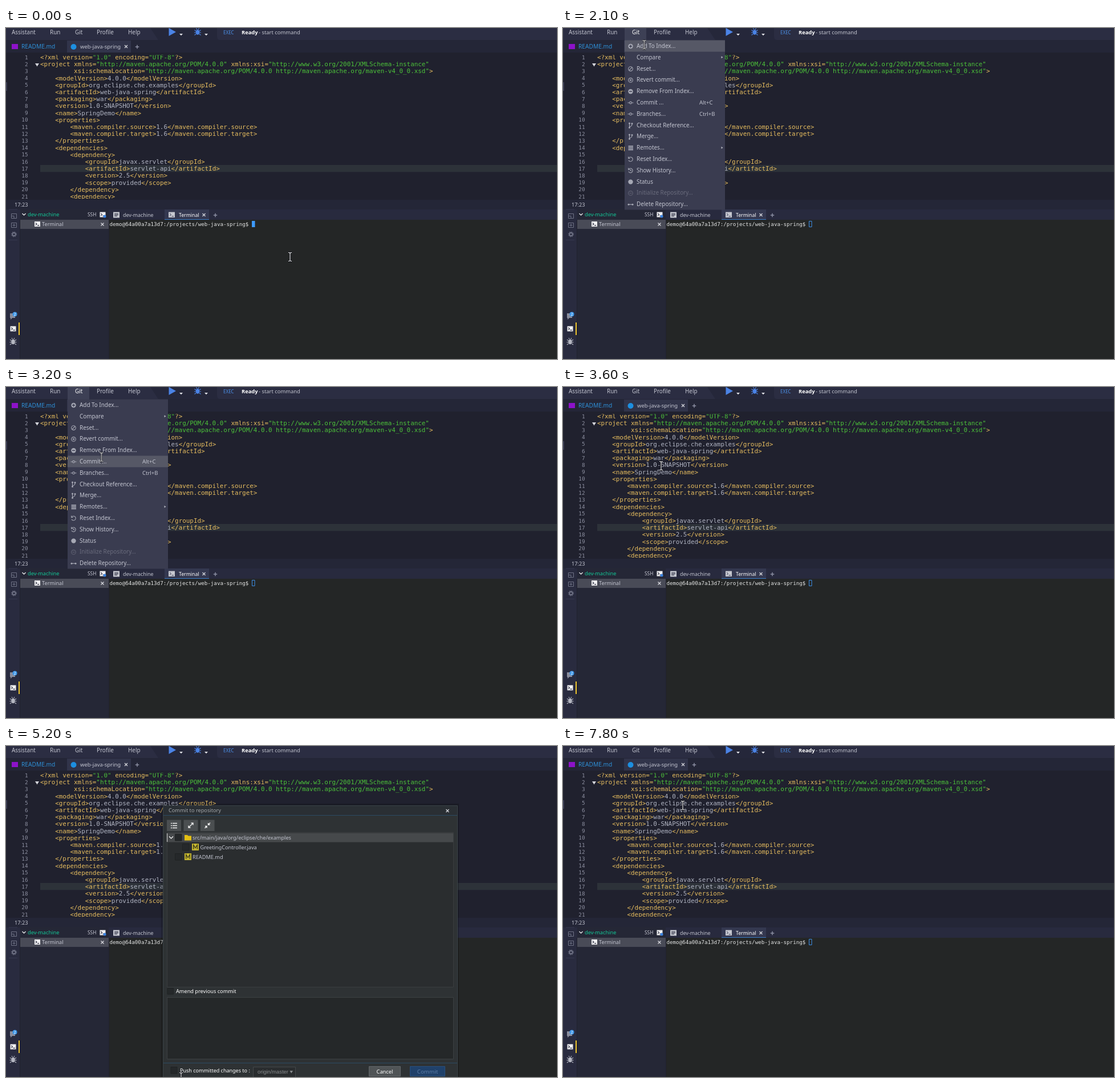
An HTML page that plays this animation: 966x580 px, repeating every 8000 ms.

```html
<!DOCTYPE html>
<html lang="en">
<head>
<meta charset="utf-8">
<title>Commit from the Git menu</title>
<style>
html, body { margin: 0; width: 100%; height: 100%; overflow: hidden; background: #20212e; }
svg { display: block; width: 966px; height: 580px; }
text { font: 9.9px "Noto Sans", "Open Sans", sans-serif; fill: #c3c5d0; white-space: pre; }
.s { font-size: 9.2px; }
.w { fill: #fff; }
.b { font-weight: 600; fill: #fff; }
.mid { text-anchor: middle; }
.mono, #code text { font-family: "DejaVu Sans Mono", monospace; }
#code text { font-size: 10.9px; fill: #e6bd5f; }
#code .num { font-size: 9.3px; fill: #8e91a2; text-anchor: end; }
#code .str { fill: #4cc23a; }
#code .txt { fill: #b0b4c2; }
.line { fill: none; stroke: #a6a8b4; stroke-width: 1.1; }
.box { fill: #25282a; stroke: #1f2223; }
.combo { font: 9.3px "Liberation Sans", Arial, sans-serif; }

/* all parts share one 8 s clock that ticks every 100 ms */
.a { animation: 8s step-end infinite; }
#pointer { animation-name: move; }
#menu { animation-name: menu; }
#hover { animation-name: hover; }
#dialog { animation-name: dialog; }
#solid { animation-name: solid; }
#hollow { animation-name: hollow; }
.on { animation-name: on; }
.off { animation-name: off; }
#profile { animation-name: profile; }
#git { animation-name: git; }
@keyframes menu { 0%, 45%, 100% { visibility: hidden } 23.75% { visibility: visible } }
@keyframes dialog { 0%, 93.75%, 100% { visibility: hidden } 47.5% { visibility: visible } }
@keyframes solid { 0% { opacity: 1 } 23.75%, 100% { opacity: 0 } }
@keyframes hollow { 0% { opacity: 0 } 23.75%, 100% { opacity: 1 } }
@keyframes on { 0% { opacity: 0 } 66.25%, 100% { opacity: 1 } }
@keyframes off { 0% { opacity: 1 } 66.25%, 100% { opacity: 0 } }
@keyframes profile { 0%, 16.25%, 100% { font-weight: 400; fill: #c3c5d0 } 13.75% { font-weight: 600; fill: #fff } }
@keyframes git { 0%, 23.75%, 100% { font-weight: 400; fill: #c3c5d0 } 21.25% { font-weight: 600; fill: #fff } }
@keyframes hover {
  0% { transform: translateY(0); opacity: 0 }
  26.25% { transform: translateY(0); opacity: 1 }
  28.75% { transform: translateY(19.8px); opacity: 1 }
  32.5% { transform: translateY(39.6px); opacity: 1 }
  33.75% { transform: translateY(59.4px); opacity: 1 }
  36.25% { transform: translateY(79.2px); opacity: 1 }
  40%, 100% { transform: translateY(99px); opacity: 1 }
}
@keyframes move {
  0% { transform: translate(498px, 401px) }
  1.25% { transform: translate(498px, 401px); animation-timing-function: steps(5) }
  7.5% { transform: translate(191px, 118px) }
  8.75% { transform: translate(191px, 118px); animation-timing-function: steps(4) }
  13.75% { transform: translate(166px, 16px) }
  15% { transform: translate(166px, 16px); animation-timing-function: steps(2) }
  17.5% { transform: translate(156px, 28px); animation-timing-function: steps(3) }
  21.25% { transform: translate(141px, 19px) }
  25% { transform: translate(141px, 19px); animation-timing-function: steps(4) }
  30% { transform: translate(147px, 60px) }
  32.5% { transform: translate(151px, 77px); animation-timing-function: steps(4) }
  37.5% { transform: translate(165px, 115px) }
  38.75% { transform: translate(165px, 115px); animation-timing-function: steps(3) }
  42.5% { transform: translate(172px, 138px) }
  45% { transform: translate(172px, 138px); animation-timing-function: steps(7) }
  53.75% { transform: translate(427px, 301px) }
  55% { transform: translate(427px, 301px); animation-timing-function: steps(4) }
  60% { transform: translate(315px, 520px); animation-timing-function: steps(2) }
  62.5% { transform: translate(307px, 580px) }
  68.75% { transform: translate(331px, 580px) }
  70% { transform: translate(331px, 580px); animation-timing-function: steps(4) }
  75% { transform: translate(476px, 575px) }
  76.25% { transform: translate(468px, 578px) }
  77.5% { transform: translate(468px, 578px); animation-timing-function: steps(2) }
  80% { transform: translate(468px, 600px) }
  85% { transform: translate(468px, 600px); animation-timing-function: steps(5) }
  91.25% { transform: translate(440px, 478px); animation-timing-function: steps(4) }
  96.25% { transform: translate(303px, 161px) }
  97.5%, 100% { transform: translate(210px, 104px) }
}
</style>
</head>
<body>
<svg viewBox="0 0 966 580">
  <defs>
    <clipPath id="page"><path d="M0 47.5H966V299.5H0Z"/></clipPath>
    <g id="bug" stroke-width="1.1">
      <ellipse cy="1" rx="3.2" ry="4.2" stroke="none"/>
      <path d="M-5.5 -3L-3 -1M5.5 -3L3 -1M-6 1.5H6M-5.5 6L-3 4M5.5 6L3 4M-2.5 -6L-1 -3.5M2.5 -6L1 -3.5" fill="none"/>
    </g>
    <g id="term">
      <path d="M-5 -4.5H5V4.5H-5Z" fill="#f0f0f2"/>
      <path d="M-3.2 -2.2L-1 0L-3.2 2.2M0 2.4H3.2" fill="none" stroke="#2a2c3e" stroke-width="1.1"/>
    </g>
    <path id="cross" d="M-2.5 -2.5L2.5 2.5M2.5 -2.5L-2.5 2.5" fill="none" stroke="#d5d6dc" stroke-width="1.3"/>
    <path id="plus" d="M-3.2 0H3.2M0 -3.2V3.2" fill="none" stroke="#8b8fa2" stroke-width="1.5"/>
    <path id="caret" d="M-3 -1.5H3L0 1.8Z" fill="#e4e5ea"/>
    <g id="mod">
      <path d="M-6 -6H6V6H-6Z" fill="#c3b52f"/>
      <path d="M-3.3 3.8V-3.6L0 1.6L3.3 -3.6V3.8" fill="none" stroke="#3b3a1c" stroke-width="1.3"/>
    </g>
  </defs>

  <path d="M0 0H966V580H0Z" fill="#20212e"/>

  <!-- menu bar -->
  <path d="M0 0H966V21H0Z" fill="#25273a"/>
  <path d="M0 0H253L267 21H0ZM370 0H966V21H376Q370 21 370 15Z" fill="#2b2d42"/>
  <text x="10" y="11">Assistant</text>
  <text x="77" y="11">Run</text>
  <text id="git" class="a" x="121" y="11">Git</text>
  <text id="profile" class="a" x="159" y="11">Profile</text>
  <text x="214" y="11">Help</text>
  <path d="M285.5 0V14L298 7Z" fill="#4b83e6"/>
  <use href="#caret" x="307" y="11.5"/>
  <use href="#bug" x="336" y="6.5" fill="#4b83e6" stroke="#4b83e6"/>
  <use href="#caret" x="351" y="11.5"/>
  <text x="381" y="10.5" style="font-size:8px;fill:#4b8fe6">EXEC</text>
  <text class="b" x="413" y="10.5" style="font-size:9.3px">Ready</text>
  <text x="443" y="10.5" style="font-size:9.4px">- start command</text>

  <!-- editor tabs -->
  <path d="M0 21H966V43H0Z" fill="#242637"/>
  <path d="M107 22H219V43H107Z" fill="#31344a"/>
  <path d="M10 28H21V37H10Z" fill="#8d12c9"/>
  <text x="27" y="36" style="font-size:10.2px;fill:#2e8fd6">README.md</text>
  <circle cx="118.5" cy="33" r="5" fill="#1d8fe0"/>
  <text x="130" y="36" style="font-size:9.5px">web-java-spring</text>
  <use href="#cross" x="210.5" y="32.5"/>
  <use href="#plus" x="230" y="33"/>

  <path d="M60 240H966V252.2H60Z" fill="#2d3239"/>
  <path d="M0 95H2V110H0Z" fill="#3a3c52"/>
  <g id="code" clip-path="url(#page)"></g>
  <path d="M51 62H58L54.5 67.5Z" fill="#d5d6dc"/>

  <!-- status bar and lower panels -->
  <path d="M0 301H966V318H0Z" fill="#242637"/>
  <text class="s" x="15" y="313">17:23</text>
  <path d="M0 318H966V336H0Z" fill="#282a3e"/>
  <path d="M0 318H24V580H0Z" fill="#292b3f"/>
  <path d="M25 318H180V580H25Z" fill="#252736"/>
  <path d="M25 336H180V352H25Z" fill="#494b57"/>
  <path d="M181 336H966V580H181Z" fill="#242626"/>
  <path d="M5 318H20M5 371.500H20" stroke="#363950"/>
  <g fill="none" stroke="#6f7285">
    <path d="M9.500 325.500H18.500V333.500H9.500ZM9.500 329.500H14V333.500"/>
    <path d="M9.500 341.500H18.500V349.500H9.500ZM11.500 345.500H16.500M14 343V348"/>
    <circle cx="14" cy="361.500" r="2.800" stroke-width="2"/>
    <circle cx="14" cy="361.500" r="4.500" stroke-dasharray="1.800 1.730"/>
  </g>
  <path d="M7 500H16V508H11L8 511V508H7Z" fill="#8b8e9d"/>
  <circle cx="15.500" cy="501.500" r="4" fill="#3b95e8"/>
  <text class="mid w" x="15.500" y="504" style="font-size:7px">2</text>
  <use href="#term" x="12.500" y="527"/>
  <path d="M22 516H24V538H22Z" fill="#f0c62e"/>
  <use href="#bug" x="12.500" y="549" fill="#b5b7c2" stroke="#b5b7c2"/>

  <path class="line" d="M28.500 325L31.500 328L34.500 325" style="stroke:#fff"/>
  <text class="s" x="38" y="329.500" style="fill:#13c796">dev-machine</text>
  <text x="143" y="330" style="font-size:8.400px">SSH</text>
  <use href="#term" x="169.500" y="327"/>
  <circle cx="173" cy="330" r="2.500" fill="#3b83e0"/>
  <use href="#term" x="55" y="343.500"/>
  <text class="s" x="63" y="347">Terminal</text>
  <use href="#cross" x="169" y="344" style="stroke:#fff"/>

  <path d="M188 322.500H199V332.500H188Z" fill="#c6c8d0"/>
  <path d="M190 325.500H197M190 327.500H197M190 329.500H195" stroke="#282a3e"/>
  <text x="205" y="330.500" style="font-size:8.900px">dev-machine</text>
  <path d="M278 318H356V336H278Z" fill="#343850"/>
  <path d="M278 335H356V336H278Z" fill="#3b7cc6"/>
  <path d="M285 322.500H296V332H285Z" fill="#c6c8d0"/>
  <path d="M287 325L289.500 327.200L287 329.500M290.500 330H294" fill="none" stroke="#343850"/>
  <text class="w" x="303" y="330.500" style="font-size:8.700px">Terminal</text>
  <use href="#cross" x="347" y="327.500"/>
  <use href="#plus" x="367" y="328"/>
  <text class="mono" x="181.500" y="347" style="font-size:9.210px;fill:#e3e4e4">demo@64a00a7a13d7:/projects/web-java-spring$</text>
  <path id="solid" class="a" d="M431 338H436.500V349H431Z" fill="#3d9bff"/>
  <path id="hollow" class="a" d="M431.500 338.500H436V348.500H431.500Z" fill="none" stroke="#3d8fe8"/>

  <g id="menu" class="a">
    <path d="M108 0H146V22H108Z" fill="#3d4055"/>
    <text class="w" x="121" y="11">Git</text>
    <path d="M108 21.600H284V318.600H108Z" fill="#3a3c50"/>
    <path id="hover" class="a" d="M108 21.600H284V41.400H108Z" fill="#565866"/>
    <g id="items"></g>
  </g>

  <g id="dialog" class="a">
    <path d="M272 101H794V580H272Z" fill="#000" opacity=".18"/>
    <path d="M275.500 104.500H791.500V590H275.500Z" fill="#2e3234" stroke="#3a4247"/>
    <path d="M276 105H791V121H276Z" fill="#2a2f34"/>
    <path d="M276 121.500H791M276 555.500H791" stroke="#2b4b63"/>
    <text class="s" x="285" y="116" style="fill:#a4a8ab">Commit to repository</text>
    <use href="#cross" x="774" y="113.500"/>
    <path d="M282 129.500H307V149H282ZM311.500 129.500H336.500V149H311.500ZM341 129.500H365.500V149H341Z" fill="#4b4f51"/>
    <path d="M289 135.500H291M292 135.500H300M289 139.500H291M292 139.500H300M289 143.500H291M292 143.500H300" stroke="#eee" stroke-width="1.700"/>
    <g fill="none" stroke="#eee" stroke-width="1.400">
      <path d="M320 143L328 135M324.500 135H328V138.500M320 139.500V143H323.500"/>
      <path d="M348.500 144L352 140.500M349 140.500H352V143.500M358 134.500L354.500 138M354.500 135V138H357.500"/>
    </g>
    <path d="M282.500 151.500H784.500V422.500H282.500Z" fill="#2a2d2f" stroke="#393d3f"/>
    <path d="M282 152.500H784V168.500H282Z" fill="#46494b"/>
    <path d="M282.500 153V168" stroke="#d8d8d8"/>
    <path class="line" d="M286 158.500L289.500 162L293 158.500" style="stroke:#fff"/>
    <path class="box" d="M296.500 154.500H308V166H296.500ZM309.500 171.500H321V183H309.500ZM296.500 188.500H308V200H296.500ZM283 424.500H293.500V435H283ZM289 562.500H300V574H289Z"/>
    <path d="M313 156H318L319.500 157.500H325V165.500H313Z" fill="#e3bf13"/>
    <text class="s" x="327" y="163.500">src/main/java/org/eclipse/che/examples</text>
    <use href="#mod" x="332" y="177"/>
    <text class="s" x="340.500" y="180.500">GreetingController.java</text>
    <use href="#mod" x="319" y="194"/>
    <text class="s" x="327" y="197.500">README.md</text>
    <text class="s w" x="298" y="433">Amend previous commit</text>
    <path d="M282.500 440.500H784.500V548.500H282.500Z" fill="#252829" stroke="#3c4042"/>
    <text class="w" x="305" y="571.500" style="font-size:9px">Push committed changes to :</text>
    <path class="a on" d="M290.500 568L293.200 571L298 564.500" fill="none" stroke="#3d9bff" stroke-width="1.900"/>
    <path d="M433.500 562.500H507.500V585H433.500Z" fill="#2a2d2f" stroke="#44484a"/>
    <g class="a off" fill="#8a8d8f"><text class="combo" x="441" y="573.500" style="fill:#8a8d8f">origin/master</text><path d="M497.500 569H503L500.200 573.500Z"/></g>
    <g class="a on" fill="#fff"><text class="combo w" x="441" y="573.500">origin/master</text><path d="M497.500 569H503L500.200 573.500Z"/></g>
    <path d="M636.500 561.500H691.500V578.500H636.500Z" fill="#505456" stroke="#62676a"/>
    <text class="mid w" x="664" y="573.500" style="font-size:9.300px">Cancel</text>
    <path d="M708.500 561.500H769.500V578.500H708.500Z" fill="#20416a" stroke="#28507f"/>
    <text class="mid" x="739" y="573.500" style="font-size:9.800px;fill:#5c7da6">Commit</text>
  </g>

  <g id="pointer" class="a" fill="none">
    <path id="beam" d="M-3 -7.500H-1.500L0 -6.500L1.500 -7.500H3M0 -6.500V6.500M-3 7.500H-1.500L0 6.500L1.500 7.500H3" stroke="#14151c" stroke-width="2.800"/>
    <use href="#beam" style="display:none"/>
    <path d="M-3 -7.500H-1.500L0 -6.500L1.500 -7.500H3M0 -6.500V6.500M-3 7.500H-1.500L0 6.500L1.500 7.500H3" stroke="#f4f4f4" stroke-width="1.100"/>
  </g>
</svg>
<script>
const put = (id, html) => { document.getElementById(id).innerHTML = html; };
const esc = s => s.replace(/&/g, '&amp;').replace(/</g, '&lt;').replace(/>/g, '&gt;');
const span = (cls, s) => `<tspan class="${cls}">${esc(s)}</tspan>`;

const source = `<?xml version="1.0" encoding="UTF-8"?>
<project xmlns="http://maven.apache.org/POM/4.0.0" xmlns:xsi="http://www.w3.org/2001/XMLSchema-instance"
         xsi:schemaLocation="http://maven.apache.org/POM/4.0.0 http://maven.apache.org/maven-v4_0_0.xsd">
    <modelVersion>4.0.0</modelVersion>
    <groupId>org.eclipse.che.examples</groupId>
    <artifactId>web-java-spring</artifactId>
    <packaging>war</packaging>
    <version>1.0-SNAPSHOT</version>
    <name>SpringDemo</name>
    <properties>
        <maven.compiler.source>1.6</maven.compiler.source>
        <maven.compiler.target>1.6</maven.compiler.target>
    </properties>
    <dependencies>
        <dependency>
            <groupId>javax.servlet</groupId>
            <artifactId>servlet-api</artifactId>
            <version>2.5</version>
            <scope>provided</scope>
        </dependency>
        <dependency>`;

// strings are green, element text is grey, the rest keeps the tag colour
const paint = s => s.split(/("[^"]*"|(?<=>)[^<]+(?=<))/)
  .map((part, i) => i % 2 ? span(part[0] === '"' ? 'str' : 'txt', part) : esc(part)).join('');

put('code', source.split('\n').map((row, i) => {
  const y = 55 + i * 12.2;
  const indent = row.search(/\S/);
  return `<text class="num" x="38.500" y="${y - 0.5}">${i + 1}</text>` +
    `<text x="${60 + indent * 6.562}" y="${y}">${paint(row.trim())}</text>`;
}).join(''));

const path = d => `<path class="line" d="${d}"/>`;
const ring = '<circle class="line" r="3.800"/>';
const disc = '<circle r="4.200" fill="#a6a8b4"/>';
const cut = d => `${disc}<path d="${d}" stroke="#3a3c50" stroke-width="1.400"/>`;
const back = path('M-3 -2.500A3.800 3.800 0 1 1 -3.500 1.800M-3.800 -4.500V-1.500H-0.800');
const branch = path('M-2 4V-4M-2 2Q2.500 2 2.500 -2') +
  '<g fill="#a6a8b4"><circle cx="-2" cy="-3.500" r="1.500"/><circle cx="-2" cy="3.800" r="1.500"/><circle cx="2.500" cy="-3" r="1.500"/></g>';
const node = path('M-5 0H-2M2 0H5') + '<circle class="line" r="1.900"/>';

const items = [
  ['Add To Index...', cut('M-2.500 0H2.500M0 -2.500V2.500')],
  ['Compare', '', '>'],
  ['Reset...', ring + path('M-2.600 2.600L2.600 -2.600')],
  ['Revert commit...', ring + path('M-1.500 -1.500L1.500 1.500M1.500 -1.500L-1.500 1.500')],
  ['Remove From Index...', cut('M-2.500 0H2.500')],
  ['Commit ...', node, 'Alt+C'],
  ['Branches...', node, 'Ctrl+B'],
  ['Checkout Reference...', branch],
  ['Merge...', branch],
  ['Remotes...', '<path d="M-4 -4H4.500V-2H-4ZM-4 -1H4.500V1H-4ZM-4 2H4.500V4H-4Z" fill="#a6a8b4"/>', '>'],
  ['Reset Index...', back],
  ['Show History...', back + path('M0 -1.800V0.500H1.800')],
  ['Status', disc],
  ['Initialize Repository...', ring + path('M-2 0H2')],
  ['Delete Repository...', path('M-4 0H4') + '<g fill="#a6a8b4"><circle cx="-3.500" r="1.500"/><circle cx="3.500" r="1.500"/></g>'],
];

put('items', items.map(([label, icon, key], i) => {
  const side = key === '>' ? '<path d="M277.500 -2L280.500 0L277.500 2Z" fill="#b5b7c2"/>'
    : key ? `<text x="239" y="3.500" style="font-size:9.500px">${key}</text>` : '';
  return `<g transform="translate(0 ${31.5 + i * 19.8})" opacity="${i === 13 ? 0.35 : 1}">` +
    `<g transform="translate(118.500 0.500)">${icon}</g><text x="129" y="3.500">${label}</text>${side}</g>`;
}).join(''));
</script>
</body>
</html>
```
